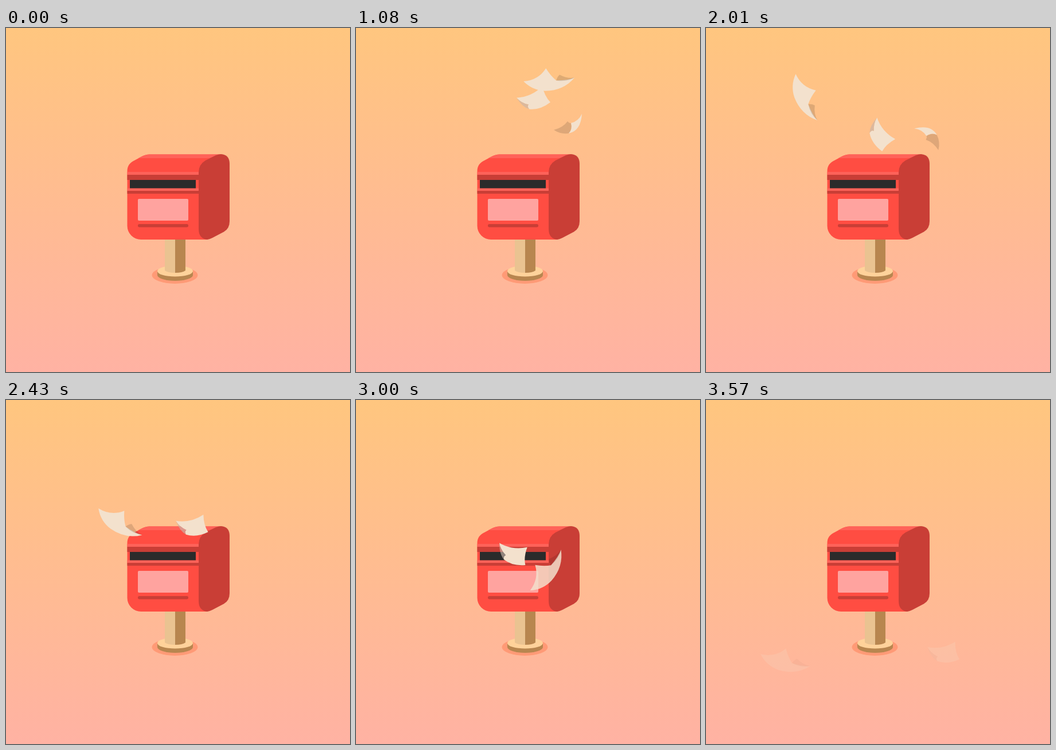
An HTML page that plays this animation: 600x600 px, repeating every 4.02 s.

```html
<!DOCTYPE html>
<html lang="en">
<head>
<meta charset="utf-8">
<title>Mailbox</title>
<style>
  html, body { margin: 0; width: 100%; height: 100%; overflow: hidden; }
  svg { display: block; width: 100vw; height: 100vh; }
  .sheet { fill: #f3e1cd; }
  .fold { fill: #000; fill-opacity: .13; }
  .pale { fill: #c9b4a8; fill-opacity: .65; }
  .red { fill: #ff4d42; }
  .dark { fill: #c93e36; }
  .light { fill: #ff6259; }
</style>
</head>
<body>
<svg viewBox="0 0 600 600">
  <defs>
    <linearGradient id="sky" x1="0" y1="0" x2="0" y2="1">
      <stop offset="0" stop-color="#ffc67f"/>
      <stop offset="1" stop-color="#ffb2a3"/>
    </linearGradient>
  </defs>
  <rect width="600" height="600" fill="url(#sky)"/>

  <g id="small" opacity="0">
    <path class="fold" d="M-25 11Q-9 7-1-4Q3 0 5-1Q8 10 1 17Q-13 19-25 11Z"/>
    <path class="sheet" d="M24-17Q18-4 5-1Q8 10 1 17Q22 13 24-17Z"/>
  </g>

  <g id="post">
    <ellipse cx="294.5" cy="431" rx="40" ry="15" fill="#ff9a76"/>
    <path d="M264 424V431A31 10 0 0 0 326 431V424Z" fill="#b8864f"/>
    <ellipse cx="295" cy="424" rx="31" ry="9.5" fill="#ffd29a"/>
    <path d="M277 365H295V427Q282 427 277 423Z" fill="#eac391"/>
    <path d="M295 365H313V423Q308 427 295 427Z" fill="#b8864f"/>
  </g>
  <g id="box">
    <path class="red" d="M211.500 250C211.500 240 216 235 224 231L237 224Q243 220.400 250 220.400H374L352 369H235.500A24 24 0 0 1 211.500 345Z"/>
    <path class="light" d="M231 227Q242 220.400 250 220.400H374L355 227Z"/>
    <path class="light" d="M211.500 251H336V256H211.500ZM211.500 279.500H336V284H211.500Z"/>
    <path class="dark" d="M211.500 256H336V265H211.500ZM211.500 284H336V289H211.500Z"/>
    <rect x="216" y="265" width="115" height="14.500" fill="#2b2b2b"/>
    <rect x="230" y="298" width="88" height="38" rx="2" fill="#ffa39f"/>
    <rect class="dark" x="230" y="342" width="88" height="5.500" rx="2.700"/>
    <path class="dark" d="M336 252Q336 238 348 231L366 222Q372 220 375 220Q390 221 390 237V337Q390 350 380 355.500L360 366Q354 369 350 369Q336 367 336 350Z"/>
  </g>

  <g id="mid" opacity="0">
    <path class="sheet" d="M-31-2Q-5-3 14-22Q18-4 28 6Q10 20-9 18Q-13 13-10 10Q-23 7-31-2Z"/>
    <path class="pale" d="M-31-2Q-21 14-9 18Q-13 13-10 10Q-23 7-31-2Z"/>
  </g>
  <g id="big" opacity="0">
    <path class="sheet" d="M-44 3Q-18 1-5-20Q3-7 13 1Q33 1 45-4Q26 19-6 19.500Q-28 19-44 3Z"/>
    <path class="fold" d="M13 1Q15-6 19-9Q32-2 45-4Q31 4 13 1Z"/>
  </g>
</svg>
<script>
const LOOP = 4020, STEP = 30, START = 660, END = 3570;

const clamp = v => Math.min(1, Math.max(0, v));

// Smooth curve through evenly spaced points, u from 0 to 1
function curve(points, u) {
  const n = points.length - 1, i = Math.min(n - 1, Math.floor(u * n)), f = u * n - i;
  const slope = k => {
    const a = Math.max(0, k - 1), b = Math.min(n, k + 1);
    return (points[b] - points[a]) / (b - a);
  };
  const ease = f * f * (3 - 2 * f), g = 1 - f;
  return points[i] + (points[i + 1] - points[i]) * ease
    + f * g * (g * slope(i) - f * slope(i + 1));
}

// A sheet rocking down through a few poses
const drift = (xs, ys, tilts) => s => {
  const u = s * 1000 / (END - START);
  return [xs, ys, tilts].map(points => curve(points, u));
};

// A sheet tumbling down behind the box; s in seconds
function tumble(s) {
  const sway = Math.sin((269 * s + 67) * Math.PI / 180);
  return [370 + 18 * sway, 150 + 40 * s - 12 * sway, 98 * s * s + 97 * s - 58];
}

const papers = [
  { id: 'big', fade: [2850, END], low: 0.2, pose: drift(
    [205, 344, 268, 163, 232, 331, 138],
    [40, 97, 135, 127, 258, 311, 454],
    [45, -5, -27, 83, 2, -50, 18]) },
  { id: 'mid', fade: [3030, END], low: 0.2, pose: drift(
    [290, 311, 275, 313, 325, 277, 416],
    [104, 127, 156, 195, 233, 283, 440],
    [50, 0, 84, 64, -7, 38, 13]) },
  { id: 'small', fade: [2220, 2400], low: 0, pose: tumble }
];
for (const p of papers) p.el = document.getElementById(p.id);

function opacity({ fade: [from, to], low }, t) {
  const shown = clamp((t - START + STEP) / 180);
  return shown * (1 - (1 - low) * clamp((t - from) / (to - from)));
}

function draw(now) {
  const t = Math.min(END, Math.floor((now % LOOP) / STEP) * STEP);
  for (const p of papers) {
    const [x, y, tilt] = p.pose(Math.max(0, t - START) / 1000);
    p.el.setAttribute('transform', `translate(${x} ${y}) rotate(${tilt})`);
    p.el.setAttribute('opacity', t < START ? 0 : opacity(p, t));
  }
}

const begin = performance.now();
function tick() {
  draw(performance.now() - begin);
  requestAnimationFrame(tick);
}
tick();
</script>
</body>
</html>
```
